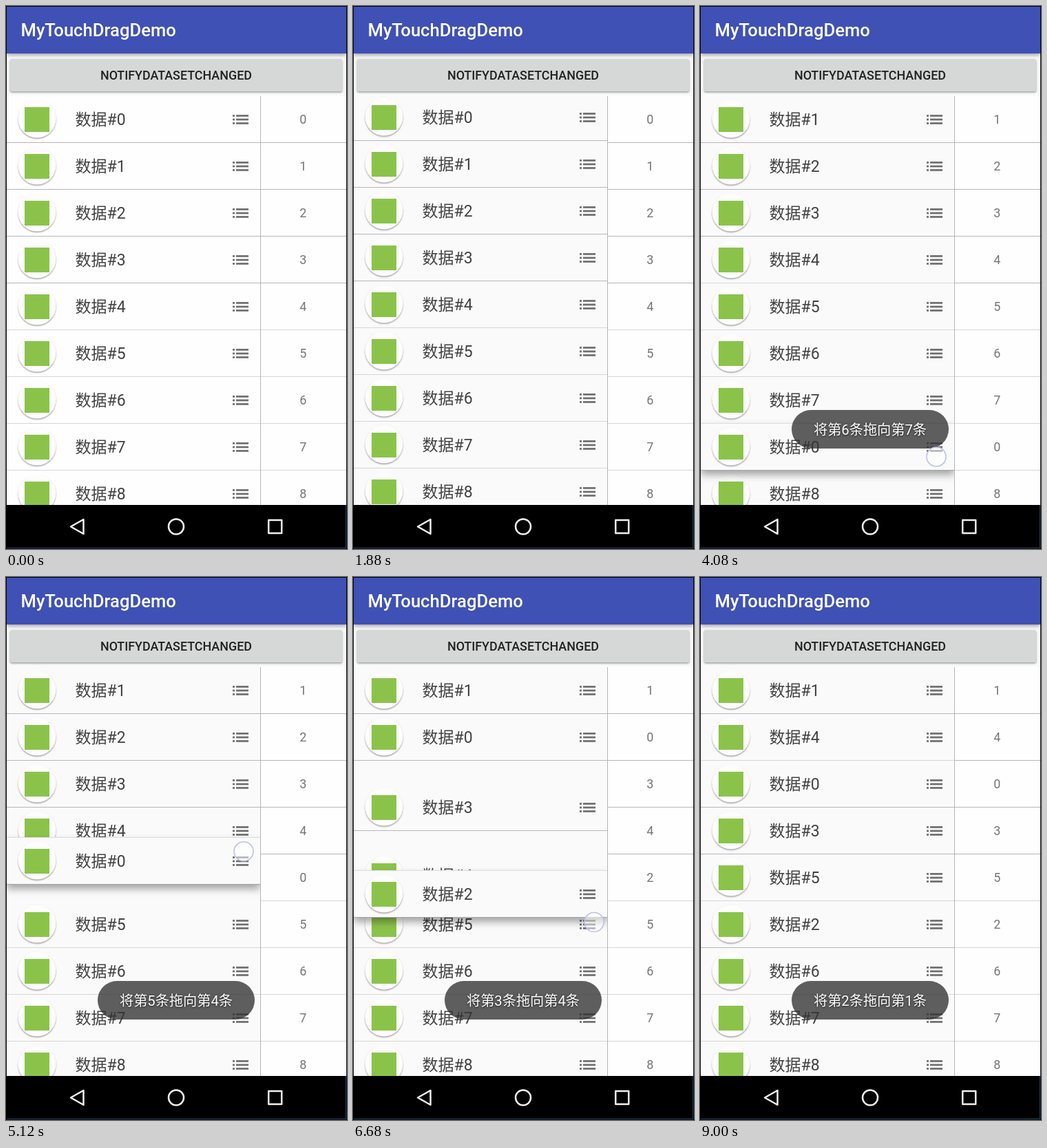
An HTML page with a canvas that plays this animation: 495x789 px, repeating every 9080 ms.

```html
<!DOCTYPE html>
<html lang="zh-CN">
<head>
<meta charset="utf-8">
<title>MyTouchDragDemo</title>
<style>
html, body { margin: 0; width: 100%; height: 100%; overflow: hidden; background: #000; }
canvas { display: block; }
</style>
</head>
<body>
<canvas id="stage" width="495" height="789"></canvas>
<script>
const stage = document.getElementById('stage').getContext('2d');
const layer = document.createElement('canvas');
layer.width = 495;
layer.height = 789;
const toastLayer = layer.getContext('2d');
let ctx = stage;

const LOOP = 9080, STEP = 40, MOVE = 250;
const TOP = 131, BOTTOM = 725, PITCH = 67.95, SPLIT = 369, RIGHT = 494, ROWS = 16;
const FAMILY = 'Roboto, "Noto Sans CJK SC", "Noto Sans CJK JP", "Noto Sans CJK", sans-serif';

const clamp = p => Math.min(1, Math.max(0, p));
const smooth = { at: p => (1 - Math.cos(Math.PI * clamp(p))) / 2, inverse: v => Math.acos(1 - 2 * v) / Math.PI };
const linear = { at: clamp, inverse: v => v };
const sineOut = p => Math.sin(clamp(p) * Math.PI / 2);
const slotTop = slot => TOP + PITCH * slot;

// A press on a handle: the finger travels `distance` from start to end, the row follows after `lag`.
const drags = [
  { press: 2560, start: 2808, end: 3068, release: 3190, lag: 48, slot: 0, distance: 485, x: 341, y: 165, ease: smooth },
  { press: 4080, start: 4100, end: 4400, release: 4470, lag: 75, slot: 7, distance: -250, x: 343, y: 655, ease: smooth },
  { press: 5120, start: 4895, end: 5660, release: 5710, lag: 75, slot: 4, distance: -258, x: 345, y: 450, ease: smooth },
  { press: 6360, start: 6310, end: 6757, release: 6790, lag: 75, slot: 2, distance: 216, x: 350, y: 301, ease: smooth },
  { press: 7320, start: 7260, end: 7875, release: 7870, lag: 75, slot: 3, distance: -200, x: 352, y: 390, ease: linear }
];
const travel = (d, t) => d.distance * d.ease.at((t - d.start) / (d.end - d.start));

// Every full row of travel swaps the dragged item with its neighbour.
const swaps = [];
const initial = Array.from({ length: ROWS }, (_, i) => i);
const swapItems = (order, { from, to }) => { [order[from], order[to]] = [order[to], order[from]]; };

const planned = [...initial];
for (const d of drags) {
  const size = Math.abs(d.distance);
  d.item = planned[d.slot];
  d.target = d.slot;
  for (let k = 1; k * PITCH < size; k++) {
    const from = d.target, to = from + Math.sign(d.distance);
    const time = d.start + d.lag + (d.end - d.start) * d.ease.inverse(k * PITCH / size);
    const swap = { time, from, to, neighbour: planned[to] };
    swaps.push(swap);
    swapItems(planned, swap);
    d.target = to;
  }
}

// Two swipes scroll the left list up and back.
const swipes = [
  { start: 520, end: 1400, size: 321, reach: 270, from: [206, 547], to: [243, 277] },
  { start: 1440, end: 1920, size: 321, reach: 282, from: [235, 290], to: [250, 572] }
];
const swiped = (s, t) => s.size * sineOut((t - s.start) / (s.end - s.start));

function rect(x, y, w, h, color) {
  ctx.fillStyle = color;
  ctx.fillRect(x, y, w, h);
}

function text(str, x, y, size, color, align = 'left', weight = 400) {
  ctx.font = `${weight} ${size}px ${FAMILY}`;
  ctx.textAlign = align;
  ctx.fillStyle = color;
  ctx.fillText(str, x, y);
}

function shape(build) {
  ctx.beginPath();
  build(ctx);
}

function withShadow(color, blur, dy, draw) {
  ctx.save();
  ctx.shadowColor = color;
  ctx.shadowBlur = blur;
  ctx.shadowOffsetY = dy;
  draw();
  ctx.restore();
}

const lineColor = i => i > 3 && i < 8 ? '#d6d6d4' : '#b6b6b6';

function drawRow(item, top, paper, lifted) {
  const y = Math.round(top), mid = y + 34;
  const fill = () => rect(1, y, SPLIT - 1, 68, paper);
  if (lifted) {
    withShadow('rgba(0,0,0,.36)', 11, 6, fill);
    rect(1, y - 1, SPLIT - 1, 1, '#dcdcdc');
  } else fill();
  rect(1, y + 67, SPLIT - 1, 1, lifted ? '#a8a8a8' : lineColor(item));
  withShadow('rgba(0,0,0,.35)', 2, 1.5, () => {
    shape(c => c.arc(45, mid - 1, 27.5, 0, 7));
    ctx.fillStyle = '#fdfdfd';
    ctx.fill();
  });
  rect(27, mid - 18, 36, 36, '#8bc34a');
  text('数据#' + item, 100.5, mid + 8, 23, '#424242');
  for (const dy of [-5.5, 0, 5.5]) {
    rect(329, mid + dy - 1.4, 3, 2.7, '#6e6e6e');
    rect(334, mid + dy - 1.4, 18, 2.7, '#6e6e6e');
  }
}

function drawLeft(t, order, done) {
  const paper = t < 520 ? '#fefefe' : '#fafafa';
  const scroll = swiped(swipes[0], t) - swiped(swipes[1], t);
  const active = drags.find(d => t >= d.press && t < d.release + MOVE);
  ctx.save();
  shape(c => c.rect(1, TOP, SPLIT - 1, BOTTOM - TOP));
  ctx.clip();
  rect(1, TOP, SPLIT, BOTTOM - TOP, paper);
  order.forEach((item, slot) => {
    if (active && item === active.item) return;
    const move = done.findLast(s => s.neighbour === item && t - s.time < MOVE);
    const place = move ? move.to + (move.from - move.to) * smooth.at((t - move.time) / MOVE) : slot;
    drawRow(item, slotTop(place) - scroll, paper);
  });
  if (active) {
    const held = slotTop(active.slot) + travel(active, Math.min(t, active.release) - active.lag);
    const settle = smooth.at((t - active.release) / MOVE);
    drawRow(active.item, held + (slotTop(active.target) - held) * settle, paper, true);
  }
  ctx.restore();
}

function drawRight(order) {
  const width = RIGHT - SPLIT;
  ctx.save();
  shape(c => c.rect(SPLIT, TOP, width, BOTTOM - TOP));
  ctx.clip();
  rect(SPLIT, TOP, width, BOTTOM - TOP, '#fefefe');
  order.forEach((item, slot) => {
    const y = Math.round(slotTop(slot));
    rect(SPLIT, y + 67, width, 1, lineColor(slot));
    text(item, 431.3, y + 40, 17.9, '#757575', 'center');
  });
  rect(SPLIT, TOP, 1, BOTTOM - TOP, '#b4b4b4');
  ctx.restore();
}

function drawChrome() {
  rect(0, 0, 495, 789, '#000');
  rect(1, 69, RIGHT - 1, BOTTOM - 69, '#fafafa');
  withShadow('rgba(0,0,0,.4)', 6, 2, () => rect(1, 1, RIGHT - 1, 68, '#3f51b5'));
  rect(RIGHT, 0, 1, 789, '#000');
  text('MyTouchDragDemo', 21.5, 44, 25.6, '#fff', 'left', 500);
  withShadow('rgba(0,0,0,.4)', 3, 1.5, () => {
    shape(c => c.roundRect(6, 77, 482, 47, 2));
    ctx.fillStyle = '#d6d7d7';
    ctx.fill();
  });
  text('NOTIFYDATASETCHANGED', 247, 107, 17.9, '#212121', 'center', 500);

  rect(1, 787, RIGHT - 1, 1, '#24486a');
  rect(RIGHT - 1, BOTTOM, 1, 787 - BOTTOM, '#24486a');
  ctx.strokeStyle = '#f2f2f2';
  ctx.lineWidth = 2.5;
  ctx.lineJoin = 'round';
  shape(c => { c.moveTo(94, 756.5); c.lineTo(112.5, 746); c.lineTo(112.5, 767); c.closePath(); });
  ctx.stroke();
  shape(c => c.arc(247, 756.5, 11, 0, 7));
  ctx.stroke();
  ctx.strokeRect(381.2, 747, 19, 19);
}

// The toast is composed on its own layer so that it fades as one piece.
function drawToast(t, done) {
  if (!done.length) return;
  const { from, to } = done[done.length - 1];
  const fade = clamp((t - done[0].time) / MOVE);
  ctx = toastLayer;
  ctx.clearRect(0, 0, 495, 789);
  shape(c => c.roundRect(133, 587, 228, 56, 28));
  ctx.fillStyle = 'rgba(50,50,50,.78)';
  ctx.fill();
  withShadow('rgba(0,0,0,.7)', 3, 1, () =>
    text(`将第${from}条拖向第${to}条`, 247, 623, 20.2, '#fff', 'center'));
  ctx = stage;
  ctx.globalAlpha = 1 - (1 - fade) ** 2;
  ctx.drawImage(layer, 0, 0);
  ctx.globalAlpha = 1;
}

function fingerAt(t) {
  const drag = drags.find(d => t >= d.press && t < d.release);
  if (drag) return [drag.x, drag.y + travel(drag, t)];
  const swipe = swipes.find(s => t >= s.start && t < s.end && swiped(s, t) < s.reach);
  if (!swipe) return null;
  const p = swiped(swipe, t) / swipe.reach;
  return swipe.from.map((v, i) => v + (swipe.to[i] - v) * p);
}

function drawFinger(t) {
  const point = fingerAt(t);
  if (!point) return;
  shape(c => c.arc(...point, 14, 0, 7));
  ctx.fillStyle = 'rgba(255,255,255,.5)';
  ctx.fill();
  ctx.strokeStyle = '#bcc0ea';
  ctx.lineWidth = 1.6;
  ctx.stroke();
}

function frame(now) {
  const t = Math.floor(now % LOOP / STEP) * STEP;
  const done = swaps.filter(s => s.time <= t);
  const order = [...initial];
  done.forEach(s => swapItems(order, s));
  drawChrome();
  drawLeft(t, order, done);
  drawRight(order);
  drawToast(t, done);
  drawFinger(t);
  requestAnimationFrame(frame);
}
requestAnimationFrame(frame);
</script>
</body>
</html>
```
